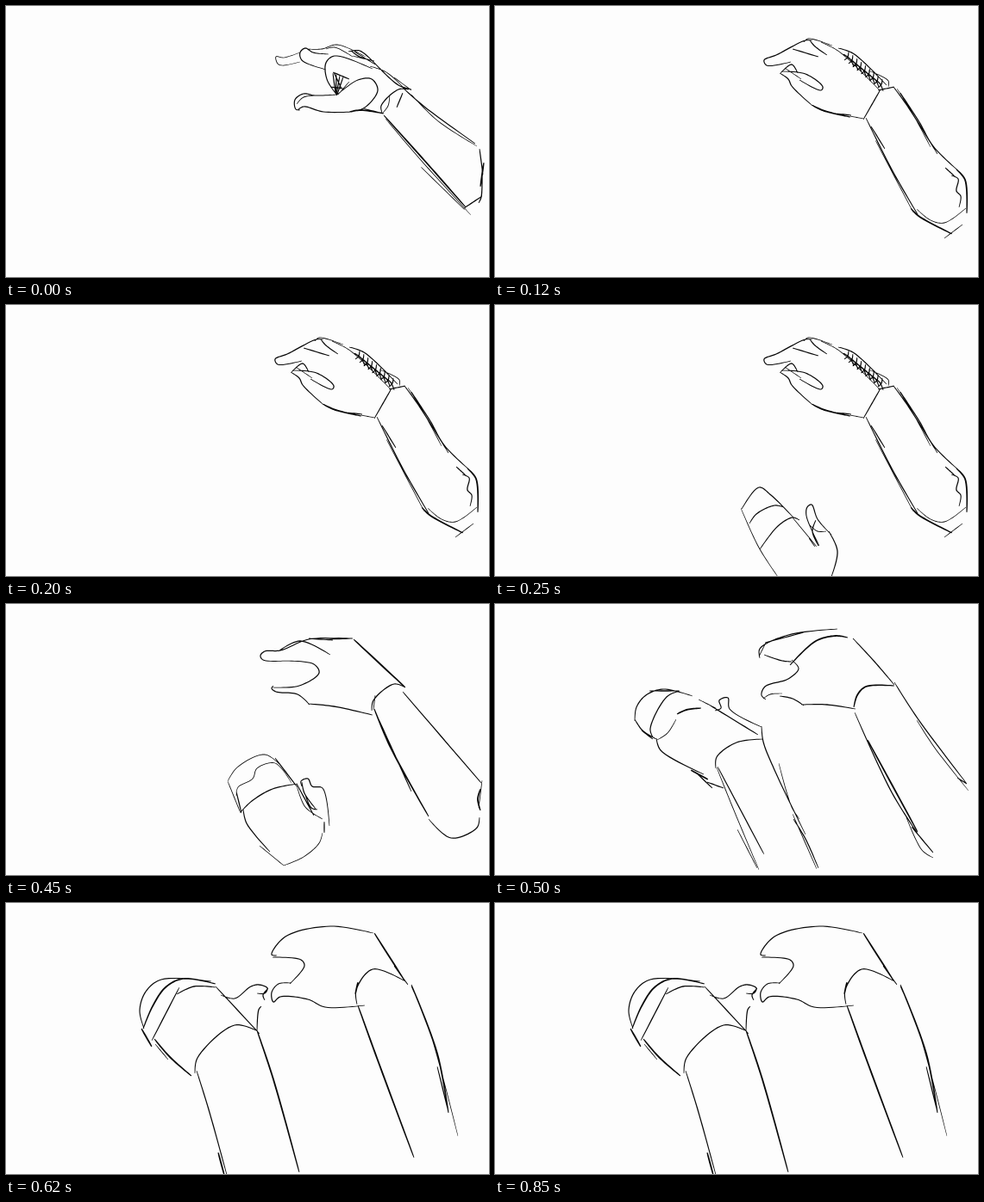
An HTML page that plays this animation: 560x315 px, repeating every 1000 ms.

```html
<!DOCTYPE html>
<html lang="en">
<head>
<meta charset="utf-8">
<title>Reaching hands</title>
<style>
html, body { margin: 0; width: 100%; height: 100%; overflow: hidden; background: #fdfdfd; }
svg { display: block; width: 100vw; height: 100vh; }
</style>
</head>
<body>
<svg id="stage" viewBox="0 0 560 315"></svg>
<script>
const svg = document.getElementById('stage');
const weights = { fine: 0.75, pen: 1.1, bold: 1.6 };

// Each line is one pen stroke: its weight, then the points it passes through.
const pointing = {
  fingers: `
fine 341 54 322 60 313 59 315 67 320 69 341 65
pen 371 74 343 63 341 54 347 49 356 54 374 56
fine 349 50 366 50 384 45 417 59
fine 371 50 381 48 402 59
pen 384 104 372 85 371 66 381 58 425 73`,
  knuckles: `
pen 397 53 410 52 428 67
pen 400 52 410 59 427 64
fine 404 53 428 68
fine 402 58 426 64
pen 425 64 455 92 470 97
fine 422 70 441 77 462 96
fine 450 83 470 98`,
  thumb: `
pen 384 103 358 104 345 102 335 109 336 120 341 121
pen 338 121 345 117 368 123 402 123
fine 337 114 345 106 366 104
pen 384 103 408 86 424 85 431 98 416 118 400 123
fine 398 88 385 103
bold 398 123 412 121 438 125
fine 414 119 438 125`,
  sleeve: `
pen 436 124 435 116 455 97 467 97
fine 445 103 443 116 437 124
pen 460 101 453 118
pen 460 95 485 117 544 160
fine 470 103 500 133 546 163
pen 549 166 553 196
bold 554 182 550 210
pen 552 186 551 222 548 229
pen 552 221 531 235
bold 438 127 490 185 533 234
fine 440 131 480 178 539 243
fine 481 187 532 237`
};

const folded = {
  fingers: `
pen 343 65 315 69 312 63 326 57 360 40 368 40
fine 358 42 363 38 391 46
pen 365 40 371 47 385 57
pen 345 50 375 59
pen 331 78 344 68 351 78
pen 332 76 360 79 380 94 378 98 353 86
fine 336 72 355 85
pen 330 78 340 85 344 93 367 115
bold 367 115 382 122 412 129
pen 394 125 413 127
fine 412 128 427 131`,
  knuckles: `
fine 378 42 399 53 446 98
pen 398 49 415 55 454 92
fine 433 75 456 87 456 94
pen 447 97 439 111 427 132
pen 444 98 463 94`,
  sleeve: `
pen 462 94 478 116 513 172
fine 466 96 482 121 505 164
pen 470 101 492 135 508 163 540 194
bold 535 190 545 202 547 241
pen 522 188 533 198
pen 529 197 537 201 535 215 540 221 538 234
pen 430 130 460 190 491 244
pen 436 140 452 166
fine 441 156 485 240
bold 482 235 491 244 530 265
fine 489 236 505 249 521 252 546 235
fine 521 270 542 254`
};

const rising = {
  palm: `
pen 286 237 306 212 320 221 346 247
fine 285 236 306 282 328 316
pen 295 254 303 243 324 233 335 235
pen 307 284 328 257 345 247 353 250
fine 345 247 373 281`,
  thumb: `
pen 376 280 361 245 362 235 367 232 374 249 390 267
pen 387 263 397 286 390 316
pen 372 250 368 263 375 280
fine 364 255 374 263 384 263
fine 371 281 364 271`
};

const open = {
  hand: `
pen 325 66 298 65 295 60 300 55 318 54 351 41 401 40
pen 317 54 341 43 376 59
pen 351 40 379 42
pen 371 41 402 40
pen 323 66 357 70 363 80 340 95 309 97
pen 310 95 308 98 313 102 338 105 352 117
pen 350 116 380 119 425 129
bold 403 41 463 97`,
  sleeve: `
pen 424 124 426 112 450 93 463 97
fine 428 106 426 123
pen 460 102 551 208
bold 427 122 445 165 490 247
pen 428 125 452 178 470 218
pen 490 250 516 272 546 260 549 248
bold 550 215 547 227 550 240
fine 552 205 548 237`
};

const lifted = {
  palm: `
fine 257 206 268 190 300 175 320 189
fine 257 206 272 243
fine 267 223 269 213 286 203 291 191 312 185 331 208
pen 267 218 273 243
pen 272 242 285 229 309 215 338 209
pen 275 239 279 255 306 288
fine 294 281 322 304
fine 322 304 345 294 363 278 367 266
pen 312 179 337 212`,
  thumb: `
pen 337 209 357 246
fine 337 211 347 236 367 250
pen 343 212 342 206 350 203 355 212 367 214 375 258
pen 343 207 346 220 359 238
pen 347 222 354 237 361 239
pen 369 253 369 266`
};

const grasping = {
  hand: `
pen 307 63 307 52 340 36 397 29
pen 313 45 358 33
fine 306 61 314 45
pen 312 59 333 66 344 67
bold 342 71 372 43 395 37 409 39
pen 344 65 352 75 340 87 313 96 309 106 314 111
fine 311 110 319 105 333 104
pen 330 107 345 110 358 118
pen 355 117 385 117 418 122
pen 415 40 440 67 463 94
bold 416 120 420 106 430 96 463 95`,
  sleeve: `
pen 463 91 490 133 547 209
fine 489 135 509 166 549 217
pen 536 202 547 209
pen 417 126 460 219 490 267
bold 432 158 490 265
pen 483 259 508 289
fine 475 243 495 286 508 295`
};

const meeting = {
  fingers: `
pen 162 136 164 120 175 106 195 99 229 107
pen 179 101 214 101
pen 162 134 171 147 187 157
pen 170 147 183 157
pen 183 155 180 145 199 108 214 101
fine 188 158 200 150 210 134
bold 211 128 222 123 239 121`,
  thumb: `
pen 187 156 192 170 242 198
bold 227 193 247 204
pen 232 195 252 214
pen 246 207 265 214
fine 236 111 256 121
pen 248 117 305 152
pen 255 124 262 121 260 112 270 109 272 122 309 143`,
  sleeve: `
pen 309 142 311 160 325 195 360 268
fine 329 185 344 236 353 250
pen 346 250 360 273 375 307
fine 345 244 373 308
pen 256 191 257 178 280 161 310 157
fine 257 190 275 235 306 309
pen 258 189 312 291
fine 281 262 304 307`
};

const clasping = {
  hand: `
pen 314 61 308 60 324 39 376 27 426 35
pen 309 63 342 66 346 73 329 94
pen 331 93 316 94 308 104 310 115 318 109 350 112 370 121 416 119
pen 407 118 406 101 425 77 463 91
bold 427 35 462 90`,
  sleeve: `
pen 450 73 466 95
bold 408 92 405 106
bold 470 95 500 175 513 244
fine 470 97 490 145 524 271
pen 500 190 513 243
bold 408 119 430 180 473 296`
};

const clasped = {
  fingers: `
pen 160 146 155 125 162 103 180 89 238 91
bold 159 146 170 120 185 98 205 88 243 94
bold 157 146 169 167
pen 169 160 201 98
pen 198 106 218 97 243 98
pen 243 97 294 152
pen 249 107 265 111 284 97 293 95 303 99 300 105 291 105
pen 304 99 298 107 300 113`,
  sleeve: `
pen 296 120 293 124 291 149
bold 172 158 190 179 215 201
fine 173 164 188 182
pen 219 198 222 180 265 142 292 149
pen 221 195 235 240 256 316
bold 246 290 253 316
bold 291 148 310 205 340 313`
};

const lerp = (a, b, t) => a + (b - a) * t;

// Diagonal cross-hatching over the folded knuckles.
function knuckleHatch() {
  const lines = [];
  for (let i = 0; i < 9; i++) {
    const x = lerp(408, 447, i / 8), y = lerp(53, 85, i / 8);
    lines.push(`pen ${x + 2} ${y} ${x + 1} ${y + 6} ${x - 3} ${y + 10}`);
    if (i < 8) lines.push(`pen ${x - 4} ${y + 3} ${x + 4} ${y + 9} ${x + 8} ${y + 18}`);
  }
  return lines.join('\n');
}

// Dark shadow between finger and thumb, fanning into one corner.
function thumbShadow() {
  const lines = ['pen 379 77 398 85', 'pen 376 94 391 96'];
  for (let i = 0; i < 4; i++) {
    lines.push(`pen ${379 + 4 * i} ${78 + 1.5 * i} ${382 + i / 2} ${101 + i}`);
  }
  lines.push('pen 380 77 389 96');
  return lines.join('\n');
}

function spline(points) {
  const out = [];
  const last = points.length - 1;
  const at = i => points[Math.max(0, Math.min(last, i))];
  for (let i = 0; i < last; i++) {
    const [a, b, c, d] = [at(i - 1), at(i), at(i + 1), at(i + 2)];
    // Centripetal spacing keeps curves tight where long and short spans meet.
    const gap = (p, q) => Math.sqrt(Math.hypot(q[0] - p[0], q[1] - p[1])) || 1;
    const ab = gap(a, b), bc = gap(b, c), cd = gap(c, d);
    for (let s = 0; s < 12; s++) {
      const t = s / 12;
      out.push([0, 1].map(k => {
        const m = c[k] - b[k] + bc * ((b[k] - a[k]) / ab - (c[k] - a[k]) / (ab + bc));
        const n = c[k] - b[k] + bc * ((d[k] - c[k]) / cd - (d[k] - b[k]) / (bc + cd));
        return b[k] + t * m + t * t * (3 * (c[k] - b[k]) - 2 * m - n)
          + t * t * t * (2 * (b[k] - c[k]) + m + n);
      }));
    }
  }
  return [...out, points[last]];
}

// Outline of a pen stroke that thins towards both ends.
function penStroke(line) {
  const [weight, ...words] = line.split(' ');
  const points = [];
  for (let i = 0; i < words.length; i += 2) points.push([+words[i], +words[i + 1]]);
  const curve = spline(points), end = curve.length - 1;
  const left = [], right = [];
  curve.forEach(([x, y], i) => {
    const p = curve[Math.max(0, i - 1)], q = curve[Math.min(end, i + 1)];
    const dx = q[0] - p[0], dy = q[1] - p[1], len = Math.hypot(dx, dy) || 1;
    const half = weights[weight] * (0.22 + 0.36 * Math.sqrt(Math.abs(Math.sin(Math.PI * i / end))));
    const ox = -dy / len * half, oy = dx / len * half;
    left.push(`${(x + ox).toFixed(2)} ${(y + oy).toFixed(2)}`);
    right.unshift(`${(x - ox).toFixed(2)} ${(y - oy).toFixed(2)}`);
  });
  return `M${left.concat(right).join('L')}Z`;
}

function pose(until, ...drawings) {
  const lines = drawings.flatMap(Object.values).join('\n').split('\n').filter(Boolean);
  const path = document.createElementNS('http://www.w3.org/2000/svg', 'path');
  path.setAttribute('d', lines.map(penStroke).join(''));
  path.setAttribute('fill', '#080808');
  svg.append(path);
  return { until, path };
}

pointing.shadow = thumbShadow();
folded.hatch = knuckleHatch();

const poses = [
  pose(120, pointing),
  pose(250, folded),
  pose(370, folded, rising),
  pose(500, open, lifted),
  pose(620, grasping, meeting),
  pose(1000, clasping, clasped)
];

const start = performance.now();
function draw(now) {
  const t = Math.max(0, now - start) % 1000;
  const current = poses.find(p => t < p.until);
  for (const p of poses) p.path.style.display = p === current ? '' : 'none';
  requestAnimationFrame(draw);
}
draw(start);
</script>
</body>
</html>
```
